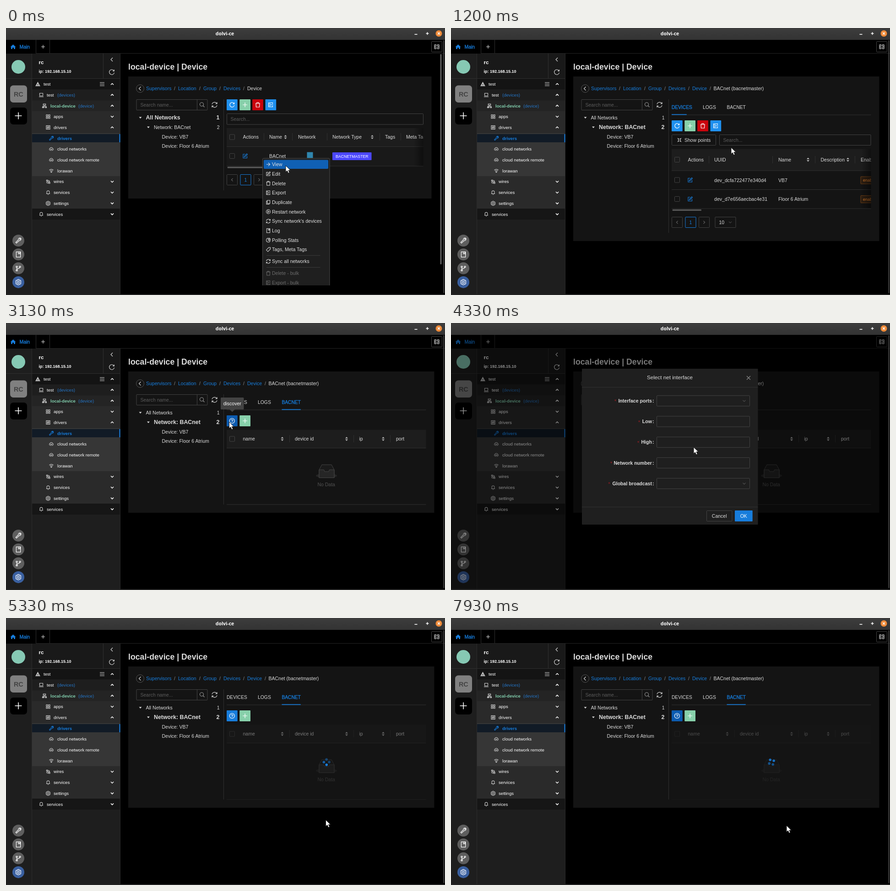
An HTML page that plays this animation: 959x584 px, repeating every 8 s.

```html
<!DOCTYPE html>
<html lang="en">
<head>
<meta charset="utf-8">
<title>Device manager</title>
<style>
html, body { margin: 0; width: 100%; height: 100%; overflow: hidden; background: #000; }
svg { display: block; width: 959px; height: 584px; font-family: "Liberation Sans", Arial, sans-serif; }
text { white-space: pre; }
.b { font-weight: bold; }
.m { text-anchor: middle; }
.e { text-anchor: end; }
.glow { stroke: currentColor; stroke-width: .35px; }
.title { font-family: "Noto Sans", sans-serif; font-weight: bold; }
</style>
</head>
<body>
<svg id="stage" viewBox="0 0 959 584"></svg>
<script>
const BLUE = '#177ddc', SKY = '#1f90ee', GREEN = '#87d0aa', RED = '#c9040c';
const TEXT = '#dcdcdc', LINE = '#303030', EDGE = '#434343', DIM = '#5c5c5c';

const shapes = {
  edit: 'M0-4H-4.5V4.5H4V0M-2 2L-1.5 0L3.5-5L5-3.5L0 1.5Z',
  trash: 'M-5-3H5M-2-3V-5H2V-3M-4-3L-3.5 5H3.5L4-3',
  arrow: 'M-4.5 0H4M0-4L4 0L0 4',
  export: 'M4-2V-4.5H-4.5V4.5H4V2M-1.5 0H5M-4.5-2H0M-4.5 2H0',
  copy: 'M-2.5-4.5H4V3H-2.5ZM-2.5-3H-4.5V5H2V3',
  play: 'M5 0A5 5 0 1 1-5 0A5 5 0 1 1 5 0M-1.5-2.5L2.5 0L-1.5 2.5Z',
  sync: 'M-4.8-1A5 5 0 0 1 4.3-2.5M4.8-5V-2H1.8M4.8 1A5 5 0 0 1-4.3 2.5M-4.8 5V2H-1.8',
  reload: 'M4.4-2.6A5 5 0 1 0 5 1M4.8-5V-2.2H2',
  book: 'M-4-5H4V5H-4ZM0-5V-1L1.5-2L3-1V-5',
  pie: 'M0-4.5A4.7 4.7 0 1 0 4.5 1H0ZM2-5A4 4 0 0 1 5-1H2Z',
  tag: 'M-5 1L1-5H5V-1L-1 5ZM2.5-2.5H3',
  plus: 'M-5 0H5M0-5V5',
  left: 'M2-4L-2 0L2 4',
  right: 'M-2-4L2 0L-2 4',
  up: 'M-3 1.5L0-1.5L3 1.5',
  down: 'M-3-1.5L0 1.5L3-1.5',
  help: 'M5.5 0A5.5 5.5 0 1 1-5.5 0A5.5 5.5 0 1 1 5.5 0M-1.8-1.3A1.8 1.8 0 1 1 0 .6V1.5M0 2.7V3.4',
  search: 'M3 -1A4 4 0 1 1-5-1A4 4 0 1 1 3-1M2 2L5 5',
  cross: 'M-4-4L4 4M4-4L-4 4',
  menu: 'M-5-3.5H5M-5 0H5M-5 3.5H5',
  warn: 'M0-4.5L5 4.5H-5ZM0-1.5L2.5 3H-2.5Z',
  laptop: 'M-4-4H4V2H-4ZM-5.5 4.5H5.5',
  tree: 'M-3-4.5H3V-1.5H-3ZM0-1.5V1M-4 3V1H4V3M-5 3H-2V5H-5ZM2 3H5V5H2ZM-1 1V5',
  grid: 'M-4.5-4.5H-1V-1H-4.5ZM1-4.5H4.5V-1H1ZM-4.5 1H-1V4.5H-4.5ZM1 1H4.5V4.5H1Z',
  sliders: 'M-4.5-4.5H4.5V4.5H-4.5ZM-2-3V3M0-3V3M2-3V3M-3 1H-1M1-1H3',
  wrench: 'M-5 3.5L0-1.5A3 3 0 0 1 4-5L2-3L3-2L5-4A3 3 0 0 1 1.5 0L-3.5 5Z',
  cloud: 'M-3 3A2.5 2.5 0 0 1-3.5-1.5A3.7 3.7 0 0 1 3.5-1.5A2.5 2.5 0 0 1 3 3M-1.5 4V0H1.5V4',
  wifi: 'M-5-1.5A7 7 0 0 1 5-1.5M-3.3 .7A4.6 4.6 0 0 1 3.3 .7M-1.5 2.8A2 2 0 0 1 1.5 2.8L0 4Z',
  wires: 'M-4-4H-1V-1H-4ZM1.5 1.5H4.5V4.5H1.5ZM-1-2.5H2A1.5 1.5 0 0 1 2 .5H-2A1.5 1.5 0 0 0-2 3.5H1.5',
  bell: 'M-4.5 3H4.5M-3.2 3V-1A3.2 3.2 0 0 1 3.2-1V3M0-4.2V-5M-1 5H1',
  gear: 'M2 0A2 2 0 1 1-2 0A2 2 0 1 1 2 0M-1.3-5H1.3L2-3.4L4-3.6L5-1.4L4 0L5 1.4L4 3.6L2 3.4L1.3 5H-1.3L-2 3.4L-4 3.6L-5 1.4L-4 0L-5-1.4L-4-3.6L-2-3.4Z',
  branch: 'M-3-2V3M3-2C3 1-3 0-3 2.5M-4.2-4H-1.8V-2H-4.2ZM1.8-4H4.2V-2H1.8ZM-4.2 3H-1.8V5H-4.2Z',
  shrink: 'M-4.5-4.5L-1.5-1.5M4.5-4.5L1.5-1.5M-4.5 4.5L-1.5 1.5M4.5 4.5L1.5 1.5M-1.5-3.5V-1.5H-3.5M1.5-3.5V-1.5H3.5M-1.5 3.5V1.5H-3.5M1.5 3.5V1.5H3.5',
  split: 'M-5-4.5H-1.5V-1.2H-5M-5 1.2H-1.5V4.5H-5M-5-4.5V4.5M5-4.5H1.5V-1.2H5M5 1.2H1.5V4.5H5M5-4.5V4.5'
};

const txt = (x, y, s, fill = TEXT, size = 10.5, cls = '') =>
  `<text x="${x}" y="${y}" fill="${fill}" color="${fill}" font-size="${size}" class="${cls}">${s}</text>`;
const box = (x, y, w, h, fill, more = '') =>
  `<rect x="${x}" y="${y}" width="${w}" height="${h}" fill="${fill}" ${more}/>`;
const frame = (x, y, w, h, stroke = EDGE, fill = 'none') =>
  box(x + .5, y + .5, w - 1, h - 1, fill, `stroke="${stroke}" rx="1"`);
const icon = (n, x, y, color = TEXT, k = 1, w = 1.1) =>
  `<path d="${shapes[n]}" transform="translate(${x} ${y}) scale(${k})" fill="none" stroke="${color}" stroke-width="${w / k}"/>`;
const disc = (x, y, r, fill, more = '') => `<circle cx="${x}" cy="${y}" r="${r}" fill="${fill}" ${more}/>`;
const hline = (x, y, w, c = LINE) => box(x, y, w, 1, c);
const vline = (x, y, h, c = LINE) => box(x, y, 1, h, c);
const tri = (x, y, c = TEXT) => `<path d="M${x - 3} ${y - 1.5}h6l-3 3.5z" fill="${c}"/>`;
const sorter = (x, y) => `<path d="M${x - 3} ${y - 1}h6l-3-3.6zM${x - 3} ${y + 1}h6l-3 3.6z" fill="#b5b5b5"/>`;
const check = (x, y) => frame(x - 6, y - 6, 12, 12);
const group = (id, s, more = '') => `<g id="${id}" ${more}>${s}</g>`;
const button = (x, y, n, fill, id = '') =>
  box(x, y, 23.7, 24, fill, `rx="1" id="${id}"`) + icon(n, x + 11.8, y + 12, '#fff', 1, 1.2);

function titleBar() {
  return box(0, 0, 959, 26, 'url(#bar)') + txt(478, 16, 'dolvi-ce', '#fff', 10.5, 'title m') +
    box(892.5, 13, 6, 1.6, '#fff') + icon('plus', 920.5, 12, '#fff', .6, 1.5) +
    disc(945.5, 12, 7, '#ee8a38') + icon('cross', 945.5, 12, '#fff', .6, 1.4);
}

function sidebar() {
  let s = hline(65, 55, 894, '#242424') + vline(65, 26, 29) + vline(95, 26, 29) +
    '<path d="M9.5 41.5L15.5 36L21.5 41.5H20V46H17V43H14V46H11V41.5Z" fill="#177ddc"/>' +
    txt(29.5, 45, 'Main', BLUE, 10.4, 'glow') + icon('plus', 81, 41, TEXT, .8) +
    frame(929, 29, 24, 24) + icon('split', 941, 41) +
    box(0, 56, 250, 528, '#1e1e1e') + box(57, 56, 193, 54, '#191919') +
    hline(0, 110, 250) + vline(56, 56, 528, '#2c2c2c') + vline(212, 56, 54) + vline(249, 56, 528, '#292929') +
    disc(27, 85, 15, '#86c9b4') +
    box(9, 125.5, 37, 37.5, '#808080', 'rx="7"') + txt(27.3, 149.5, 'RC', '#444', 14.4, 'b m') +
    box(9, 174, 37, 37, '#000', 'rx="7"') + icon('plus', 27, 192, '#fff', 1.5, 1.6);
  ['wrench', 'book', 'branch', 'gear'].forEach((n, i) => {
    const y = 465 + i * 30.3;
    s += disc(27, y, 13, i == 3 ? '#3a60a0' : '#5e5e5e') + icon(n, 27, y, '#fff', 1.15, 1.2);
  });
  s += txt(71.5, 78.5, 'rc', '#fff', 11.7, 'b') + txt(71.5, 97.5, 'ip: 192.168.15.10', '#fff', 9, 'b') +
    icon('left', 231, 69) + icon('reload', 231, 96.5, TEXT, 1.1);
  [[111, 23.5, '#141414'], [134.5, 24, '#1e1e1e'], [158.5, 23.7, '#242424'], [182, 48, '#2a2a2a'],
   [230, 94, '#363636'], [324, 71, '#2a2a2a'], [395, 24, '#161616']]
    .forEach(([y, h, c]) => s += box(57, y, 192, h, c));
  s += box(57, 232, 192, 18, '#111b26') + box(247.5, 232, 2, 18, BLUE);
  [['warn', 69.5, 82, 'test', 'up'], ['laptop', 77, 89, 'test', 'up'], ['tree', 84, 97, 'local-device', 'up'],
   ['grid', 92, 104, 'apps', 'down'], ['sliders', 92, 104, 'drivers', 'up'], ['wrench', 99, 112, 'drivers'],
   ['cloud', 99, 112, 'cloud networks'], ['cloud', 99, 112, 'cloud network remote'], ['wifi', 99, 112, 'lorawan'],
   ['wires', 92, 104, 'wires', 'down'], ['bell', 92, 104, 'services', 'down'], ['gear', 92, 104, 'settings', 'down'],
   ['bell', 77, 89, 'services', 'down']].forEach(([n, ix, x, label, arrow], i) => {
    const y = 122.7 + i * 23.7, c = i == 2 ? '#82cfae' : i == 5 ? BLUE : '#fff';
    s += icon(n, ix, y, i == 5 ? BLUE : TEXT, .9, 1) + txt(x, y + 3.4, label, c, 9.6, i == 2 || i == 5 ? 'b' : '');
    if (arrow) s += icon(arrow, 232, y, '#fff', 1, 1.5);
  });
  return s + icon('menu', 210, 122.7) + txt(112, 149.8, '(devices)', '#2474c4', 9.6) +
    txt(158, 173.5, '(device)', '#2474c4', 9.6);
}

function common() {
  let s = txt(267, 91, 'local-device | Device', TEXT, 17.7, 'b') + box(267, 106, 668.5, 267, '#141414', 'id="panel"') +
    disc(293, 132.5, 8.5, 'none', 'stroke="#555"') + icon('left', 292.5, 132.5);
  [[306, 'Supervisors'], [376, 'Location'], [431, 'Group'], [475, 'Devices']]
    .forEach(([x, w]) => s += txt(x, 136.3, w, BLUE));
  [367, 422, 466, 518].forEach(x => s += txt(x, 136.3, '/', '#8c8c8c'));
  return s + frame(284.5, 156, 156, 24) + vline(417, 156, 24, EDGE) + txt(293.5, 172, 'Search name...', DIM) +
    icon('search', 428.5, 168, '#999') + icon('sync', 455.5, 168, TEXT, 1.15) +
    tri(293.5, 196) + tri(311, 217) + txt(340.5, 241.6, 'Device: VB7') + txt(340.5, 262.3, 'Device: Floor 6 Atrium') +
    vline(475, 156, 198, LINE).replace('<rect', '<rect id="divider"');
}

const pager = y => frame(482, y, 24, 24) + icon('left', 494, y + 12, '#666', .8) + frame(511.5, y, 24, 24, BLUE) +
  txt(523.4, y + 15.8, '1', BLUE, 10.5, 'm') + frame(541, y, 24, 24) + icon('right', 553, y + 12, '#666', .8);
const tools = y => button(482, y, 'reload', SKY) + button(510.3, y, 'plus', GREEN) +
  button(538.2, y, 'trash', RED) + button(566.5, y, 'export', SKY);
const heads = (y, list) => list.map(([x, s]) => txt(x, y, s)).join('');

function networks() {
  return txt(527, 136.3, 'Device') + txt(305.5, 200, 'All Networks', TEXT, 12.4, 'b') +
    txt(466.5, 200, '1', TEXT, 12.4, 'b e') + txt(323, 220.6, 'Network: BACnet') + txt(466.5, 220.6, '2', TEXT, 10.5, 'e') +
    tools(156) + frame(482, 187, 430, 24.5) + txt(490.5, 203, 'Search...', DIM) +
    `<g clip-path="url(#clipA)">` + box(482, 219, 430, 40, '#1d1d1d') + box(482, 259, 430, 43, '#191919') +
    hline(482, 259, 430) + hline(482, 301.5, 430) + check(494, 238.5) + check(494, 280) +
    [563, 625, 701, 816, 862].map(x => vline(x, 230, 16)).join('') +
    heads(242.3, [[517.5, 'Actions'], [575, 'Name'], [638, 'Network'], [713, 'Network Type'], [828, 'Tags'], [874, 'Meta Tags']]) +
    sorter(610.5, 238.5) + sorter(800, 238.5) + icon('edit', 522.5, 280, BLUE) + txt(575, 284, 'BACnet') +
    box(657.5, 271.5, 13, 13, '#2f86ae') + box(713, 272, 85.5, 17, '#4b47ff', 'rx="1"') +
    txt(755.8, 283.7, 'BACNETMASTER', '#fff', 8.7, 'm') + box(890, 219, 22, 83, 'url(#fade)') + '</g>' +
    box(483.5, 303.5, 110, 3, DIM, 'rx="1.5"') + pager(320) + box(948.5, 57, 3, 460, '#606060', 'rx="1.5"');
}

function menu() {
  let s = box(560.5, 285, 146.5, 290, '#1f1f1f', 'stroke="#4a4a4a" rx="2"') + box(563, 288.5, 141, 19.5, '#1060b4', 'rx="2"');
  [['arrow', 'View'], ['edit', 'Edit'], ['trash', 'Delete'], ['export', 'Export'], ['copy', 'Duplicate'],
   ['play', 'Restart network'], ['sync', "Sync network's devices"], ['book', 'Log'], ['pie', 'Polling Stats'],
   ['tag', 'Tags, Meta Tags'], ['sync', 'Sync all networks'], ['trash', 'Delete - bulk'], ['export', 'Export - bulk']]
    .forEach(([n, label], i) => {
      const y = 298.3 + i * 20.7 + (i > 9 ? 5.2 : 0) + (i > 10 ? 5.2 : 0), c = i > 10 ? '#6b6b6b' : '#e2e2e2';
      s += icon(n, 573, y, c, .9, 1) + txt(581, y + 3.8, label, c);
    });
  return s + hline(569, 497, 117.5, '#3a3a3a') + hline(569, 523, 117.5, '#3a3a3a');
}

function deviceTabs() {
  const tab = (id, x, s) => txt(x, 177.2, s, TEXT, 10.2).replace('<text', `<text id="${id}"`);
  return txt(527, 136.3, 'Device', BLUE) + txt(565, 136.3, '/', '#8c8c8c') + txt(573.5, 136.3, 'BACnet (bacnetmaster)') +
    txt(305.5, 200, 'All Networks') + txt(466.5, 200, '1', TEXT, 10.5, 'e') +
    txt(323, 220.6, 'Network: BACnet', TEXT, 12.4, 'b') + txt(466.5, 220.6, '2', TEXT, 12.4, 'b e') +
    tab('tabDev', 482, 'DEVICES') + txt(550, 177.2, 'LOGS', TEXT, 10.4) + tab('tabNet', 602.5, 'BACNET') +
    hline(482, 189.5, 435.5) + box(482, 188.5, 44, 1.7, BLUE, 'id="ink"');
}

function devices() {
  let s = tools(202) + frame(482, 233, 97, 24) + icon('shrink', 499, 245, TEXT, .9, 1) + txt(510, 248.8, 'Show points') +
    frame(586, 233, 331.5, 24) + txt(594.5, 248.8, 'Search...', DIM) + '<g clip-path="url(#clipB)">' +
    box(482, 264.5, 436, 47.5, '#1d1d1d') + hline(482, 311.5, 436) + check(494, 288) +
    [563, 702, 795, 882].map(x => vline(x, 280, 16)).join('') +
    heads(291.8, [[517.5, 'Actions'], [575, 'UUID'], [715, 'Name'], [807.5, 'Description'], [895, 'Enable']]) +
    sorter(780, 288) + sorter(867, 288);
  [['dev_dcfa722477e340d4', 'VB7'], ['dev_d7e656aecbac4e31', 'Floor 6 Atrium']].forEach(([id, name], i) => {
    const y = 332.5 + i * 41.5;
    s += check(494, y) + icon('edit', 522.5, y, BLUE) + txt(575, y + 4.2, id, TEXT, 10.6) + txt(715, y + 4.2, name) +
      frame(894.5, y - 8, 45, 17, '#6b3c14', '#2b1d11') + txt(900, y + 3.7, 'enabled', '#d87a2a', 9) + hline(482, y + 20.5, 436);
  });
  return s + box(896, 264.5, 22, 130, 'url(#fade)') + '</g>' + box(483.5, 396.7, 63.5, 3, DIM, 'rx="1.5"') + pager(413) +
    frame(576.5, 413, 46, 24) + txt(585.5, 428.8, '10') + icon('down', 610, 425, '#444');
}

function discovery() {
  const table = box(482, 233.5, 435.5, 40, '#1d1d1d') + hline(482, 273, 435.5) + check(494, 253.5) +
    [619, 759, 839].map(x => vline(x, 245, 16)).join('') +
    heads(257.2, [[517.5, 'name'], [631, 'device id'], [771.5, 'ip'], [852, 'port']]) +
    [603.5, 744, 824].map(x => sorter(x, 253.5)).join('') +
    group('empty', '<ellipse cx="700" cy="334" rx="23" ry="5" fill="#262626"/>' +
      '<path d="M684 321L690 310H711L717 321V338.5H684Z" fill="#1a1a1a" stroke="#444"/>' +
      '<path d="M684 321H694.5L696 325H705L706.5 321H717V338.5H684Z" fill="#262626" stroke="#444"/>' +
      txt(699.7, 357, 'No Data', '#515151', 10.5, 'm')) + box(482, 297.5, 435.5, 1, LINE, 'id="foot"');
  return button(482, 202, 'help', BLUE, 'ask') + button(510.3, 202, 'plus', GREEN) + group('table', table) +
    group('spin', [0, 1, 2, 3].map(() => disc(0, 0, 2.8, BLUE)).join(''));
}

function modal() {
  let s = box(286, 100, 384.5, 341, '#1f1f1f', 'rx="1"') + hline(286, 140, 384.5) + hline(286, 402, 384.5) +
    txt(478, 123.3, 'Select net interface', TEXT, 11.7, 'm') + icon('cross', 650, 120, '#8c8c8c');
  [[364.5, 'Interface ports', 1], [416.5, 'Low'], [414.5, 'High'], [355.5, 'Network number'], [351, 'Global broadcast', 1]]
    .forEach(([x, label, list], i) => {
      const y = 170.3 + i * 45.2;
      s += txt(x - 7.5, y + 5, '*', '#a61d24', 10.5) + txt(439, y + 3.7, label, TEXT, 10.6, 'b e') +
        txt(440, y + 3.7, ':', TEXT, 10.6, 'b') + frame(449, y - 12, 204, 24) +
        (list ? icon('down', 640.5, y, '#555') : '');
    });
  return s + frame(558, 410, 56.5, 24) + txt(586.2, 425.8, 'Cancel', TEXT, 10.5, 'm') +
    box(620, 410, 38.7, 24, BLUE, 'rx="1"') + txt(639.3, 425.8, 'OK', '#fff', 10.5, 'm');
}

const stage = document.getElementById('stage');
stage.innerHTML = `<defs>
  <linearGradient id="bar" x2="0" y2="1"><stop stop-color="#3d3d3d"/><stop offset="1" stop-color="#333"/></linearGradient>
  <linearGradient id="fade"><stop stop-color="#000" stop-opacity="0"/><stop offset="1" stop-color="#000" stop-opacity=".45"/></linearGradient>
  <clipPath id="clipA">${box(482, 215, 429.5, 100, '#000')}</clipPath>
  <clipPath id="clipB">${box(482, 260, 435.5, 140, '#000')}</clipPath>
  <clipPath id="clipM">${box(550, 280, 170, 283, '#000')}</clipPath></defs>` +
  box(0, 0, 959, 584, '#000') + sidebar() + common() + group('networks', networks()) +
  group('tabs', deviceTabs()) + group('devices', devices()) + group('discovery', discovery()) +
  group('menu', menu(), 'clip-path="url(#clipM)"') +
  group('tip', box(469, 163, 50.5, 26, EDGE, 'rx="1.5"') + `<path d="M488.5 189h11.5l-5.7 5.5z" fill="${EDGE}"/>` +
    txt(494.2, 179.7, 'discover', '#fff', 10.5, 'm')) +
  box(0, 26, 959, 558, '#000', 'id="mask"') + group('modal', modal()) + titleBar() +
  box(955.5, 27, 2, 553, '#484848', 'rx="1"') + box(0, 582, 959, 2, '#262626') +
  '<path id="cursor" d="M0 0V14L3.3 11L5.6 16.4L8.2 15.2L5.9 10.2H10.4Z" fill="#fff" stroke="#111" stroke-width=".9"/>';

const $ = {};
stage.querySelectorAll('[id]').forEach(n => $[n.id] = n);

const ramp = (t, a, b) => Math.min(1, Math.max(0, (t - a) / (b - a)));
const smooth = p => p * p * (3 - 2 * p);
const put = (n, o) => { for (const k in o) n.setAttribute(k, o[k]); };
const show = (n, o) => put(n, { opacity: +o });

// time, x, y of the pointer tip
const path = [[0, 611, 301], [70, 611, 301], [200, 611, 301.5], [870, 611, 301.5], [1180, 612, 261.5], [1670, 612, 261.5],
  [2020, 631, 176.5], [2150, 631, 176.5], [2470, 557, 205], [2530, 557, 205], [2830, 487.5, 216.5], [4150, 487.5, 216.5],
  [4670, 640, 414], [4930, 645, 422], [5100, 645, 422], [5500, 732, 454], [6700, 732, 454], [6900, 733, 454], [8000, 733, 454]];

function pointer(t) {
  const i = path.findIndex(k => k[0] > t), [a, x, y] = path[i - 1], [b, u, v] = path[i];
  const p = smooth(ramp(t, a, b));
  return `translate(${x + (u - x) * p} ${y + (v - y) * p})`;
}

function spinner(t) {
  const turn = (t - 6130) / 1200 * 360 + 329;
  [...$.spin.children].forEach((d, i) => {
    const a = (turn + i * 90) * Math.PI / 180;
    const q = (((t - 6130) / 2000 + .9 - i * .2) % 1 + 1) % 1;
    put(d, { cx: 700.2 + 5.8 * Math.cos(a), cy: 315.2 + 5.8 * Math.sin(a), opacity: .3 + .7 * (1 - Math.abs(2 * q - 1)) });
  });
}

function draw(t) {
  const first = t < 1000, list = !first && t < 2050, picked = t >= 2130, loading = t >= 5130;
  show($.networks, first);
  show($.menu, 1 - ramp(t, 830, 950));
  show($.tabs, !first);
  show($.devices, list);
  show($.discovery, !first && !list);
  show($.empty, picked);
  const bottom = first ? 373 : list ? 466 : picked ? 415 : 316;
  put($.panel, { width: first ? 662.5 : 668.5, height: bottom - 106 });
  put($.divider, { height: bottom - 174 });
  put($.foot, { y: bottom - 18.5 });

  const slide = smooth(ramp(t, 2130, 2430));
  put($.ink, { x: 482 + 120.5 * slide, width: 44 * smooth(ramp(t, 1000, 1300)) - 2.7 * slide });
  put($.tabDev, { fill: picked ? TEXT : BLUE, class: picked ? '' : 'glow' });
  put($.tabNet, { fill: t >= 1980 ? BLUE : TEXT, class: picked ? 'glow' : '' });
  $.tabDev.style.color = $.tabNet.style.color = BLUE;

  const dark = (t > 2730 && t < 4230) || t > 5600;
  put($.ask, { fill: dark ? '#0c5bb0' : BLUE });
  show($.tip, ramp(t, 2880, 3030) - ramp(t, 3900, 4030));

  const opened = ramp(t, 3900, 4200), closed = ramp(t, 5080, 5300);
  const k = (1 - Math.pow(1 - opened, 3)) * (1 - closed * closed);
  show($.mask, .45 * k);
  show($.modal, k);
  const s = .2 + .8 * k;
  put($.modal, { transform: `translate(${494 * (1 - s)} ${218 * (1 - s)}) scale(${s})` });

  show($.table, 1 - .73 * ramp(t, 5130, 5430));
  show($.spin, loading);
  if (loading) spinner(t);
  put($.cursor, { transform: pointer(t) });
}

const start = performance.now();
function tick() {
  draw((performance.now() - start) % 8000);
  requestAnimationFrame(tick);
}
tick();
</script>
</body>
</html>
```
